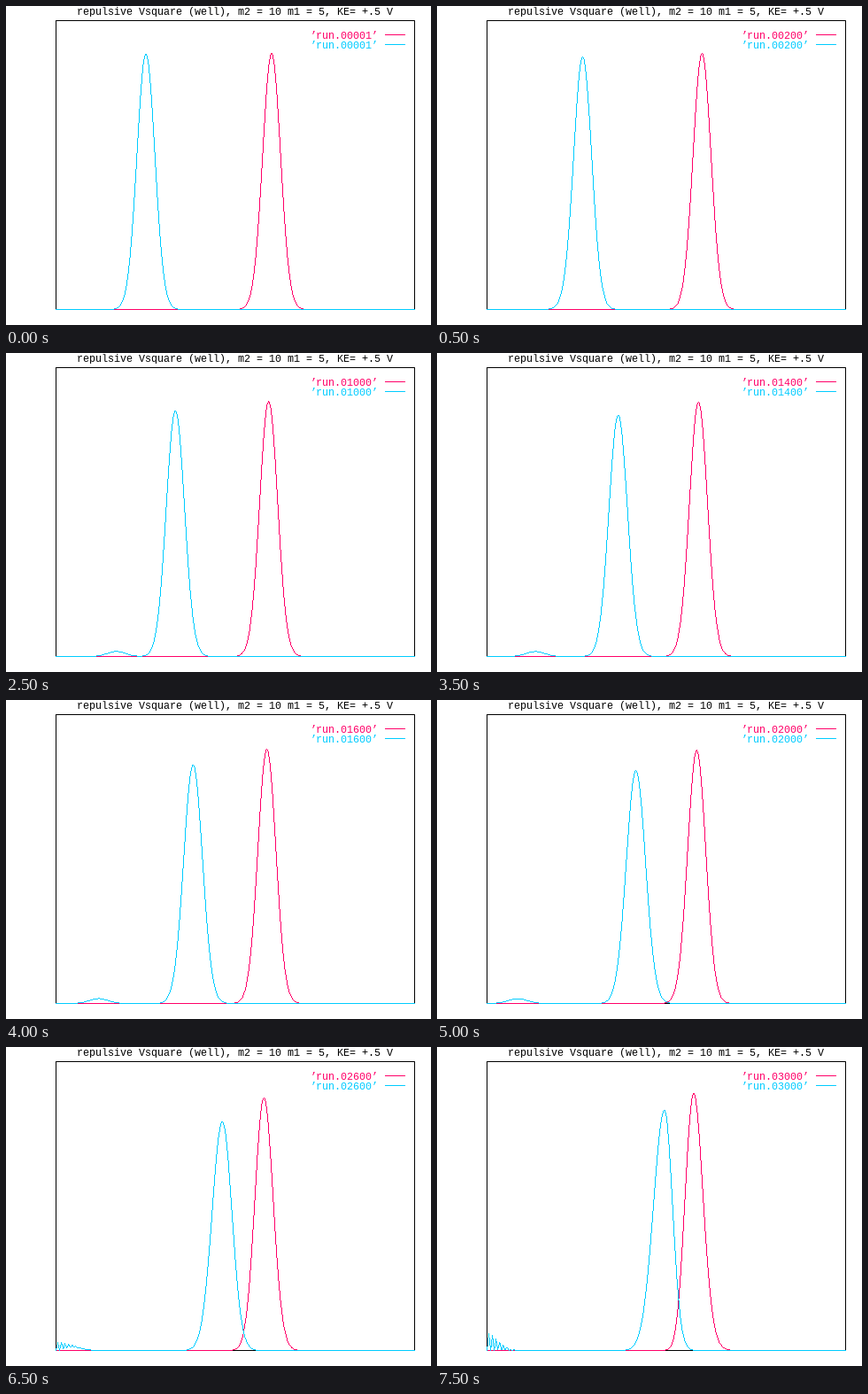
A matplotlib script for the animation above (8 s loop, 480 by 360 pixels).

```python
import numpy as np
import matplotlib.pyplot as plt
from matplotlib.animation import FuncAnimation
from matplotlib.collections import LineCollection

W, H, DPI = 480, 360, 100
LEFT, RIGHT, TOP, BASE = 56, 461, 16, 342
PINK, CYAN = "#ff0068", "#00ccff"
FRAMES, INTERVAL = 16, 500
PX = 72 / DPI

plt.rcParams.update({
    "font.family": "Liberation Mono",
    "font.size": 8.4,
    "text.hinting": "default",
    "text.hinting_factor": 1,
    "path.simplify": False,
})

fig = plt.figure(figsize=(W / DPI, H / DPI), dpi=DPI, facecolor="white")
ax = fig.add_axes([0, 0, 1, 1])
ax.set_xlim(0, W)
ax.set_ylim(H, 0)
ax.axis("off")


def pixel_line(x, y, color, z):
    """Straight one-pixel strokes through pixel centres."""
    ax.plot(np.add(x, 0.5), np.add(y, 0.5), color=color, lw=PX, snap=False,
            solid_capstyle="projecting", solid_joinstyle="miter", zorder=z)


def columns(x, height):
    """One vertical run per pixel column, joined to its neighbours."""
    y = BASE - np.round(height)
    edge = np.round((y[:-1] + y[1:] + 1) / 2)
    before, after = np.append(y[0], edge), np.append(edge, y[-1])
    top = np.minimum(y, np.minimum(before, after))
    bottom = np.maximum(y + 1, np.maximum(before, after))
    cx = x + 0.5
    return np.stack([np.column_stack([cx, top]), np.column_stack([cx, bottom])], axis=1)


def skewed(x, center, left, right, tail=0):
    """Gaussian with its own width on either side and an optional longer tail."""
    z = (x - center) / np.where(x < center, left, right)
    return np.exp(-(z / (1 + tail * z)) ** 2 / 2)


def spread(t, tau):
    return np.sqrt(1 + (t / tau) ** 2)


def squeeze(t):
    """Strength of the repulsion between the packets, 0 to 1."""
    return max(0, (t - 2200) / 800) ** 2


def heavy(x, t):
    g, q = spread(t, 12900), squeeze(t)
    s = 10.1 * g * (1 - 0.03 * q)
    return 289 / g * (1 + 0.03 * q) * skewed(x, 299.5 - t / 300, s, s, 0.035 * q)


def echo(x, t):
    """Small packet moving left that interferes with its wall reflection."""
    g = spread(t, 4987)
    s = 10.1 * g
    c = 157.5 - t / 30
    a = np.exp(-((x - c) / (2 * s)) ** 2)
    b = np.exp(-((x - 2 * LEFT + c) / (2 * s)) ** 2)
    fringe = np.cos(2 * np.pi * (x - LEFT) / 4.1)
    return 5.8 / g * (a * a + b * b - 2 * a * b * fringe)


def light(x, t):
    g, q = spread(t, 4987), squeeze(t)
    s = 10.1 * g
    shape = skewed(x, 157.5 + t / 30 - q, s * (1 + 0.06 * q), s * (1 - 0.235 * q))
    return 283 / g * (1 + 0.1175 * q) * shape + echo(x, t)


xs = np.arange(LEFT, RIGHT + 1)

pixel_line([LEFT, RIGHT, RIGHT, LEFT, LEFT], [TOP, TOP, BASE, BASE, TOP], "black", 1)
ax.text((LEFT + RIGHT) / 2, 10, "repulsive Vsquare (well), m2 = 10 m1 = 5, KE= +.5 V",
        ha="center", va="baseline", color="black")

curves, labels = [], []
for row, (density, color) in enumerate([(heavy, PINK), (light, CYAN)]):
    y = 32 + 11 * row
    pixel_line([428, 450], [y, y], color, 2)
    labels.append(ax.text(421, y + 5, "", ha="right", va="baseline", color=color))
    runs = LineCollection([], colors=color, linewidths=PX, capstyle="butt",
                          snap=False, zorder=3 + row)
    ax.add_collection(runs, autolim=False)
    curves.append((density, runs))


def update(i):
    step = max(1, 200 * i)
    for density, runs in curves:
        runs.set_segments(columns(xs, density(xs, step)))
    for label in labels:
        label.set_text(f"\u2019run.{step:05d}\u2019")
    return [runs for _, runs in curves] + labels


anim = FuncAnimation(fig, update, frames=FRAMES, interval=INTERVAL,
                     init_func=lambda: update(0), repeat=True, repeat_delay=0)
plt.show()
```
